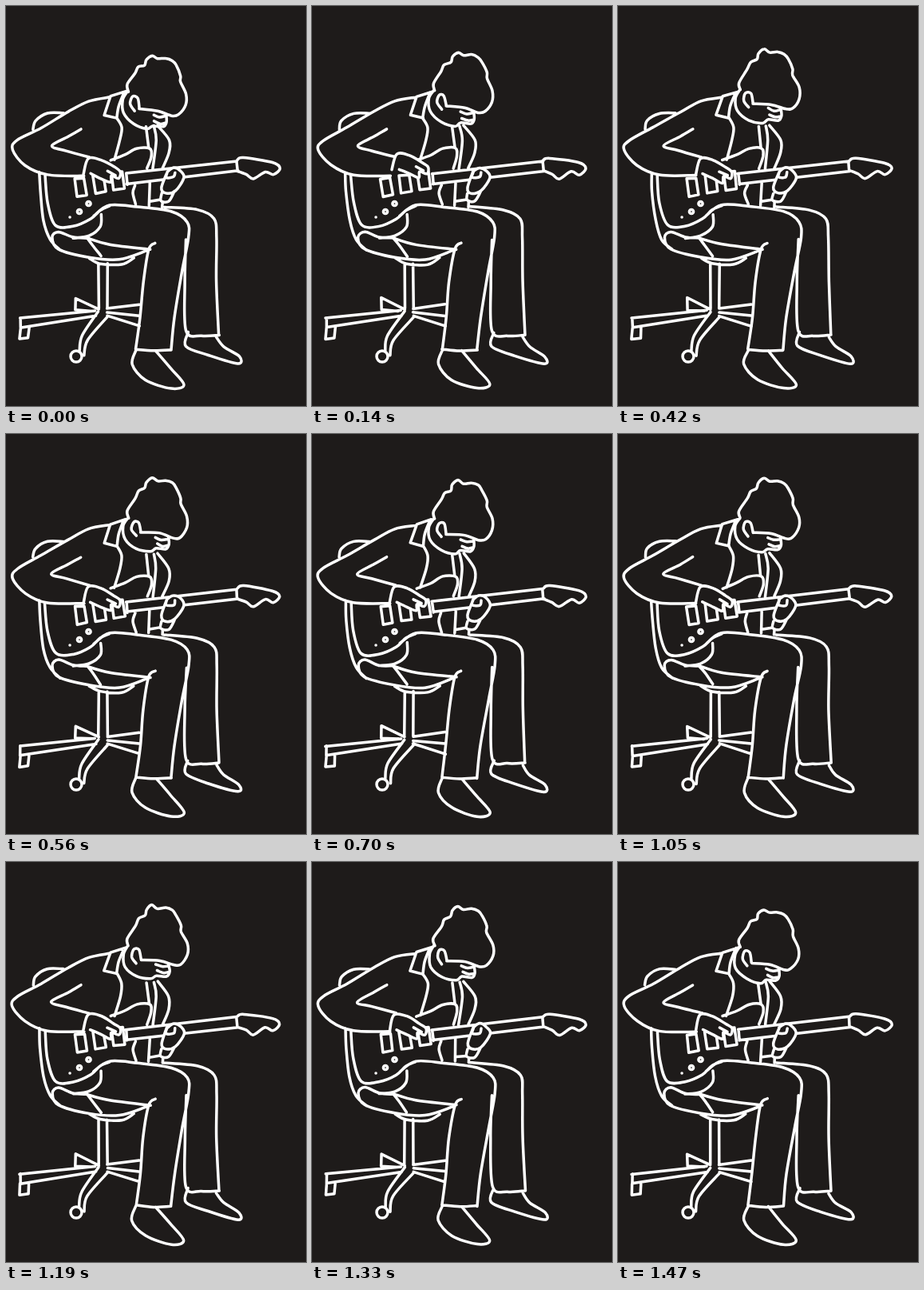
These frames come from a looping animation (376 px wide and 500 px high, 1.54 s). An HTML page:

```html
<!DOCTYPE html>
<html lang="en">
<head>
<meta charset="utf-8">
<title>Guitarist</title>
<style>
  html, body { margin: 0; width: 100%; height: 100%; overflow: hidden; background: #1e1b1a; }
  svg { display: block; width: 100vw; height: 100vh; }
  path { fill: none; stroke: #fff; stroke-width: 3.5; stroke-linecap: round; stroke-linejoin: round; }
  .solid { fill: #1e1b1a; }
</style>
</head>
<body>
<svg viewBox="0 0 376 500">
  <path id="body"/>
  <path id="hands" class="solid"/>
  <path id="head"/>
</svg>
<script>
const STEP = 70, STEPS = 22, FIRST_NOD = 12, WOBBLE = .5;
let seed = 1;

function noise() {
  const v = Math.sin(++seed * 127.1) * 43758.5453;
  return (v - Math.floor(v)) * 2 - 1;
}

const same = p => p;
const read = s => s.split(', ').map(p => p.split(' ').map(Number));
const fmt = p => p.map(v => v.toFixed(1)).join(' ');
const shake = pts => pts.map(p => p.map(v => v + WOBBLE * noise()));

// Smooth hand-drawn stroke through a few key points.
function curve(s, move = same) {
  const q = shake(read(s).map(move));
  let d = 'M' + fmt(q[0]);
  for (let i = 1; i < q.length; i++) {
    const a = q[i - 1], b = q[i], before = q[i - 2] || a, after = q[i + 1] || b;
    const c1 = a.map((v, c) => v + (b[c] - before[c]) / 6);
    const c2 = b.map((v, c) => v - (after[c] - a[c]) / 6);
    d += 'C' + [c1, c2, b].map(fmt).join(' ');
  }
  return d;
}

const line = (s, move = same) => 'M' + shake(read(s).map(move)).map(fmt).join('L');

// Two edges of a bar that widens or narrows from w1 to w2.
function bar(x1, y1, x2, y2, w1, w2) {
  const len = Math.hypot(x2 - x1, y2 - y1), nx = (y1 - y2) / len, ny = (x2 - x1) / len;
  return [-.5, .5].map(k => line(
    `${x1 + nx * w1 * k} ${y1 + ny * w1 * k}, ${x2 + nx * w2 * k} ${y2 + ny * w2 * k}`)).join('');
}

const box = (x, y, w, h, lean) =>
  line(`${x} ${y}, ${x + w} ${y - 1}, ${x + w + lean} ${y + h - 2}, ${x + lean} ${y + h}`) + 'Z';

const ring = (x, y, r) =>
  `M${x - r} ${y}a${r} ${r} 0 1 0 ${2 * r} 0a${r} ${r} 0 1 0 ${-2 * r} 0`;

function chair() {
  let d = curve('34 154, 37 143, 52 134, 72 134')
    + curve('42 208, 43 232, 47 268, 55 292, 68 305')
    + curve('101 290, 84 289, 66 282, 58 289, 66 304, 104 314, 142 317, 176 306')
    + curve('101 289, 109 299, 119 313')
    + curve('104 315, 118 322, 145 323, 160 315')
    + bar(121.5, 322, 121.5, 378, 11, 11)
    + bar(18, 396, 112, 384, 12, 7)
    + line('18 402, 17 416, 28 415, 29 402') + line('18 390, 18 402')
    + line('116 379, 87 365, 87 380, 108 381')
    + curve('116 382, 95 412, 92 431') + curve('127 389, 102 418, 98 437');
  for (const y of [373, 387, 400]) d += line(`127 ${y / 3 + 254}, 167 ${y}`);
  return d + ring(88, 438, 7);
}

function legs() {
  return curve('110 262, 130 249, 165 251, 207 257, 227 270, 229 290, 221 332, 211 390, 207 430')
    + curve('101 290, 130 298, 181 304')
    + curve('187 296, 179 304, 172 345, 168 390, 163 429')
    + curve('163 429, 185 431, 207 430')
    + curve('198 251, 240 255, 261 266, 264 290, 264 345, 267 411')
    + curve('226 292, 224 345, 226 406, 245 412, 267 411')
    + curve('119 261, 118 276, 104 287, 84 290')
    + curve('163 430, 158 448, 175 467, 207 478, 223 473, 206 452, 188 431')
    + curve('228 408, 225 425, 254 437, 291 447, 292 438, 273 426, 264 414');
}

function guitar() {
  let d = curve('49 212, 52 246, 62 274, 84 275, 106 266, 118 255, 130 250')
    + bar(151, 216, 290, 200, 13, 12.5)
    + line('151 210, 152 223') + line('289 194, 290 206')
    + curve('290 193, 298 190, 334 196, 343 203, 335 211, 325 207, 310 216, 301 210, 290 206')
    + curve('131 193, 149 186, 164 178, 180 178, 182 188, 177 203')
    + curve('162 224, 159 234, 163 248') + line('180 221, 179 249');
  for (let i = 0; i < 3; i++) d += box(86 + 23 * i, 216 - 4 * i, 12 + i, 22, 3);
  return d + ring(92, 257, 2.6) + ring(103.5, 247, 2.6) + 'M80 264h.1';
}

function jacket() {
  return curve('130 114, 104 119, 78 132, 44 152, 14 168, 8 180, 24 199, 52 211, 98 212')
    + curve('94 154, 78 163, 57 175, 75 181, 105 189')
    + line('150 107, 131 113, 123 136, 139 140') + curve('139 140, 141 125, 148 108')
    + curve('139 140, 145 152, 143 168, 136 192')
    + line('176 151, 179 177')
    + curve('185 150, 188 168, 184 204') + curve('190 149, 204 168, 204 184, 196 203')
    + line('197 236, 196 251') + line('180 244, 194 242');
}

// The strumming hand flicks upward once, early in the loop.
function hands(step) {
  const flick = Math.exp(-(((step - 2) / 1.3) ** 2));
  const strum = ([x, y]) => [x + 3 * flick, y - 6 * flick];
  return curve('97 211, 103 191, 119 193, 135 202, 143 208, 141 216, 132 213, 131 221, 119 216, 106 210', strum)
    + line('127 207, 137 212', strum)
    + curve('195 234, 194 243, 204 244, 211 232')
    + curve('202 207, 210 202, 219 206, 223 215, 212 231, 200 234, 195 227, 202 207')
    + curve('202 207, 201 214, 210 214, 212 208');
}

// Nodding lifts the front of the head and swings the face forward.
function head(step) {
  const t = step < FIRST_NOD ? step / FIRST_NOD : (step - FIRST_NOD) / (STEPS - FIRST_NOD);
  const nod = Math.sin(Math.PI * t);
  const tilt = ([x, y]) => [
    x + nod * Math.max(0, y - 100) / 12,
    y - 8 * nod * Math.min(1, Math.max(.2, (x - 142) / 35))
  ];
  return [
    '153 107, 152 98, 162 84, 166 76, 174 74, 176 67, 183 62, 190 66, 200 65, 208 68, 213 74, 219 87, 219 95, 226 110, 225 124, 216 136, 207 137, 190 131, 167 128',
    '161 131, 156 122, 159 113, 165 115, 167 128',
    '185 136, 192 139, 200 138',
    '186 144, 193 147, 200 146',
    '201 136, 201 145, 197 151, 184 150, 177 154, 160 147, 147 133, 146 117, 152 107'
  ].map(s => curve(s, tilt)).join('');
}

function draw(step) {
  const show = (id, d) => document.getElementById(id).setAttribute('d', d);
  seed = step * 1000;
  show('body', chair() + legs() + guitar() + jacket());
  show('hands', hands(step));
  show('head', head(step));
}

let shown = -1;
function tick(now) {
  const step = Math.floor(now / STEP) % STEPS;
  if (step !== shown) draw(shown = step);
  requestAnimationFrame(tick);
}
draw(0);
requestAnimationFrame(tick);
</script>
</body>
</html>
```
